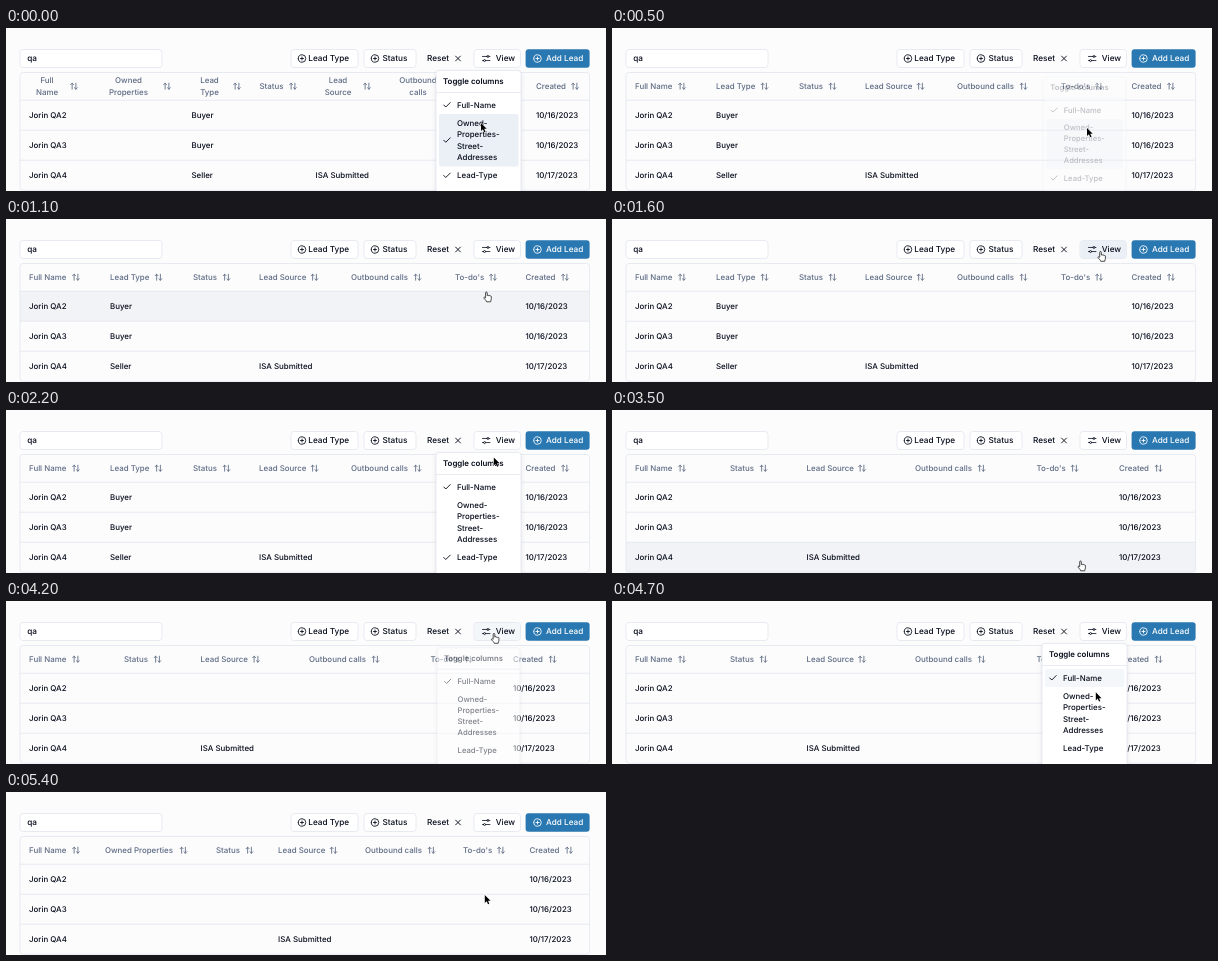
These frames come from a looping animation (600x163 px, 5.5 s). An HTML page:

```html
<!DOCTYPE html>
<html lang="en">
<head>
<meta charset="utf-8">
<title>Lead table column toggles</title>
<style>
  html, body { margin: 0; width: 100%; height: 100%; overflow: hidden; background: #fcfcfd; }
  svg { display: block; width: 600px; height: 163px; color: #060b1a; }
  text { font: 500 7.9px Inter, sans-serif; fill: currentColor; text-rendering: geometricPrecision; }
  .toolbar text { font-size: 8.2px; }
  .head { color: #5d6a82; }
  .bold { font-weight: 600; }
  .icon { fill: none; stroke: currentColor; stroke-width: 2.3; stroke-linecap: round; stroke-linejoin: round; }
  .line { fill: none; stroke: #e2e6ee; stroke-width: .8; }
</style>
</head>
<body>
<svg id="stage" viewBox="0 0 600 163"></svg>
<script>
const LOOP = 5500, STEP = 100;
const BAR_Y = 30.5, HEAD_Y = 58.2, LINE = 11.37, HOVER = '#eaf0f5';
const stage = document.getElementById('stage');

const ICONS = {
  sort: 'm21 16-4 4-4-4M17 20V4M3 8l4-4 4 4M7 4v16',
  plus: 'M2 12a10 10 0 1 0 20 0a10 10 0 1 0-20 0M8 12h8M12 8v8',
  cross: 'M18 6 6 18M6 6l12 12',
  check: 'M20 6 9 17l-5-5',
  sliders: 'M1 6h13M20 6h3M14 6a3 3 0 1 0 6 0a3 3 0 1 0-6 0M1 18h3M10 18h13M4 18a3 3 0 1 0 6 0a3 3 0 1 0-6 0'
};

const CELLS = {
  'Full Name': ['Jorin QA2', 'Jorin QA3', 'Jorin QA4'],
  'Lead Type': ['Buyer', 'Buyer', 'Seller'],
  'Lead Source': ['', '', 'ISA Submitted'],
  'Created': ['10/16/2023', '10/16/2023', '10/17/2023']
};

// Distance from the start of a heading to its sort icon
const ICON_GAP = {
  'Full Name': 47, 'Owned Properties': 78.5, 'Lead Type': 48.5, 'Status': 33.5,
  'Lead Source': 55.5, 'Outbound calls': 66.5, "To-do's": 38, 'Created': 39.5
};

// Wrapped headings: centre, icon, cell start
const WRAPPED = {
  'Full Name': [41, 68, 23], 'Owned Properties': [122.5, 161, 104], 'Lead Type': [203.5, 231, 185.5],
  'Status': [265.5, 287, 253], 'Lead Source': [332, 361, 309.5], 'Outbound calls': [412, 443, 393],
  'Created': [545, 569, 530]
};

const LAYOUTS = [
  [3100, { 'Full Name': 23, 'Lead Type': 104, 'Status': 187, 'Lead Source': 253, 'Outbound calls': 345, "To-do's": 449, 'Created': 519.5 }],
  [5300, { 'Full Name': 23, 'Status': 118, 'Lead Source': 194.5, 'Outbound calls': 303, "To-do's": 424.5, 'Created': 507 }],
  [LOOP, { 'Full Name': 23, 'Owned Properties': 99, 'Status': 210, 'Lead Source': 272, 'Outbound calls': 359, "To-do's": 457, 'Created': 523.5 }]
];

// Opening and closing times of the column menu
const MENU_TIMES = [[-1000, 500], [1800, 3100], [4200, 5300]];

const ITEMS = [
  { id: 'name', lines: ['Full-Name'], on: () => true },
  { id: 'owned', lines: ['Owned-', 'Properties-', 'Street-', 'Addresses'], on: t => t < 500 || t >= 5300 },
  { id: 'type', lines: ['Lead-Type'], on: t => t < 3100 },
  { id: 'next', lines: ['Marketing-', 'Status'], on: () => false }
];
let itemTop = 67.9;
for (const item of ITEMS) {
  item.top = itemTop;
  item.bottom = itemTop += item.lines.length * LINE + 6.83;
}

// Pointer path: time, x, y
const PATH = [
  [0, 475, 95], [300, 475, 100], [900, 475, 100], [1400, 488.5, 32.5], [1800, 488.5, 32.5],
  [2200, 487.8, 47.5], [2700, 468, 150.5], [2800, 468, 150.5], [2900, 468.5, 151], [3600, 468.5, 151],
  [4100, 488, 32.5], [4300, 488, 32.5], [4700, 483.8, 91.3], [4800, 479, 100], [5100, 478.8, 103], [LOOP, 478.8, 103]
];

const text = (x, y, content, attrs = '') => `<text x="${x}" y="${y + 2.8}" ${attrs}>${content}</text>`;
const rect = (x, y, w, h, attrs) => `<rect x="${x}" y="${y}" width="${w}" height="${h}" ${attrs}/>`;
const icon = (name, x, y, size = .375) =>
  `<path class="icon" d="${ICONS[name]}" transform="translate(${x - 12 * size} ${y - 12 * size}) scale(${size})"/>`;
const outline = (x, w) => rect(x, BAR_Y - 9, w, 18, 'rx="3" class="line" style="fill:#fff"');

function pointer(t) {
  const i = Math.max(1, PATH.findIndex(p => p[0] >= t));
  const [t0, x0, y0] = PATH[i - 1], [t1, x1, y1] = PATH[i];
  const k = Math.max(0, (t - t0) / (t1 - t0));
  return [x0 + (x1 - x0) * k, y0 + (y1 - y0) * k];
}

function menuOpacity(t) {
  const times = MENU_TIMES.find(([open, close]) => t >= open && t < close + STEP);
  if (!times) return 0;
  return t >= times[1] ? .25 : t < times[0] + STEP ? .5 : 1;
}

function hovered(t) {
  const [x, y] = pointer(t);
  if (menuOpacity(t)) {
    const item = ITEMS.find(i => y >= i.top && y < i.bottom);
    return item && menuOpacity(t) > .25 ? item.id : '';
  }
  if (Math.abs(y - BAR_Y) < 9 && x >= 468 && x < 515) return 'view';
  return y >= 72 ? 'row' + Math.floor((y - 72) / 30) : '';
}

// Hover colours trail the pointer and fade in over two steps
const glow = (id, t) => [1, 2].filter(n => hovered(t - n * STEP) === id).length / 2;

function toolbar(t) {
  return '<g class="toolbar">' +
    outline(14, 142) + text(21.3, BAR_Y, 'qa', 'font-weight="400"') +
    outline(285, 67) + icon('plus', 296, BAR_Y) + text(302.3, BAR_Y, 'Lead Type') +
    outline(358, 52) + icon('plus', 369, BAR_Y) + text(376.5, BAR_Y, 'Status') +
    text(421, BAR_Y, 'Reset') + icon('cross', 452, BAR_Y, .4) +
    outline(468, 46.5) +
    rect(468.4, BAR_Y - 8.6, 45.7, 17.2, `rx="2.6" fill="${HOVER}" opacity="${glow('view', t)}"`) +
    icon('sliders', 480.2, BAR_Y, .34) + text(489.8, BAR_Y, 'View') +
    rect(519.6, BAR_Y - 9.2, 64, 18.4, 'rx="3" fill="#2a78b1"') +
    `<g color="#fff">${icon('plus', 531.5, BAR_Y)}${text(540, BAR_Y, 'Add Lead')}</g></g>`;
}

function column(name, x, wrapped) {
  const cellX = wrapped ? x[2] : x;
  let head;
  if (wrapped) {
    const words = name.split(' ');
    head = words.map((w, i) =>
      text(x[0], HEAD_Y + (i - (words.length - 1) / 2) * LINE, w, 'text-anchor="middle"')).join('') +
      icon('sort', x[1], HEAD_Y);
  } else {
    head = text(x, HEAD_Y, name) + icon('sort', x + ICON_GAP[name], HEAD_Y);
  }
  const cells = (CELLS[name] || []).map((c, i) => text(cellX, 87 + 30 * i, c)).join('');
  return `<g class="head">${head}</g>${cells}`;
}

function table(t) {
  const wrapped = t < 500;
  const layout = wrapped ? WRAPPED : LAYOUTS.find(l => t < l[0])[1];
  const rows = [0, 1, 2].map(i =>
    rect(14, 72 + 30 * i, 569.5, 30, `fill="#f1f3f6" opacity="${glow('row' + i, t)}"`)).join('');
  return rows + rect(14, 44.5, 569.5, 117.7, 'rx="3" class="line"') +
    '<path class="line" d="M14 72.2h569.5M14 102.2h569.5M14 132.2h569.5"/>' +
    Object.entries(layout).map(([name, x]) => column(name, x, wrapped)).join('');
}

function menu(t) {
  const opacity = menuOpacity(t);
  if (!opacity) return '';
  const items = ITEMS.map(({ id, top, bottom, lines, on }) =>
    rect(433, top, 79.5, bottom - top, `rx="2" fill="${HOVER}" opacity="${glow(id, t)}"`) +
    (on(t) ? icon('check', 441, (top + bottom) / 2, .4) : '') +
    lines.map((line, i) => text(451, top + 9.1 + LINE * i, line)).join('')).join('');
  return `<g opacity="${opacity}" transform="translate(472.5 216) scale(${.95 + .05 * opacity}) translate(-472.5 -216)">` +
    rect(430, 42.5, 85, 347, 'rx="3" class="line" style="fill:#fff;filter:drop-shadow(0 2px 2px #0f172a1a)"') +
    text(437, 53.5, 'Toggle columns', 'class="bold"') +
    '<path class="line" d="M430 64.5h85"/>' + items + '</g>';
}

function cursor(t) {
  const [x, y] = pointer(t);
  if (/view|row/.test(hovered(t - STEP))) {
    return `<path transform="translate(${x - 2.8} ${y - .2})" fill="#fff" stroke="#000" stroke-width=".7" stroke-linejoin="round"
      d="M2 5.2V1a.8.8 0 0 1 1.6 0V3.8c.3-.6 1.4-.5 1.5.2.4-.5 1.3-.3 1.4.3.5-.4 1.2-.1 1.2.6V7c0 1-.6 1.6-.7 3H3c-.2-1.3-1.6-2.2-2.6-3.6-.5-.8.5-1.5 1.6-.4z"/>`;
  }
  return `<path transform="translate(${x} ${y}) scale(.9)" fill="#000" stroke="#fff" paint-order="stroke"
    d="M0 0V9L2.1 7 3.6 10.3 5 9.7 3.6 6.5H6.4Z"/>`;
}

let shown = -1;
function tick(now) {
  const t = Math.floor(now % LOOP / STEP) * STEP;
  if (t !== shown) {
    stage.innerHTML = toolbar(t) + table(t) + menu(t) + cursor(t);
    shown = t;
  }
  requestAnimationFrame(tick);
}
tick(0);
</script>
</body>
</html>
```
